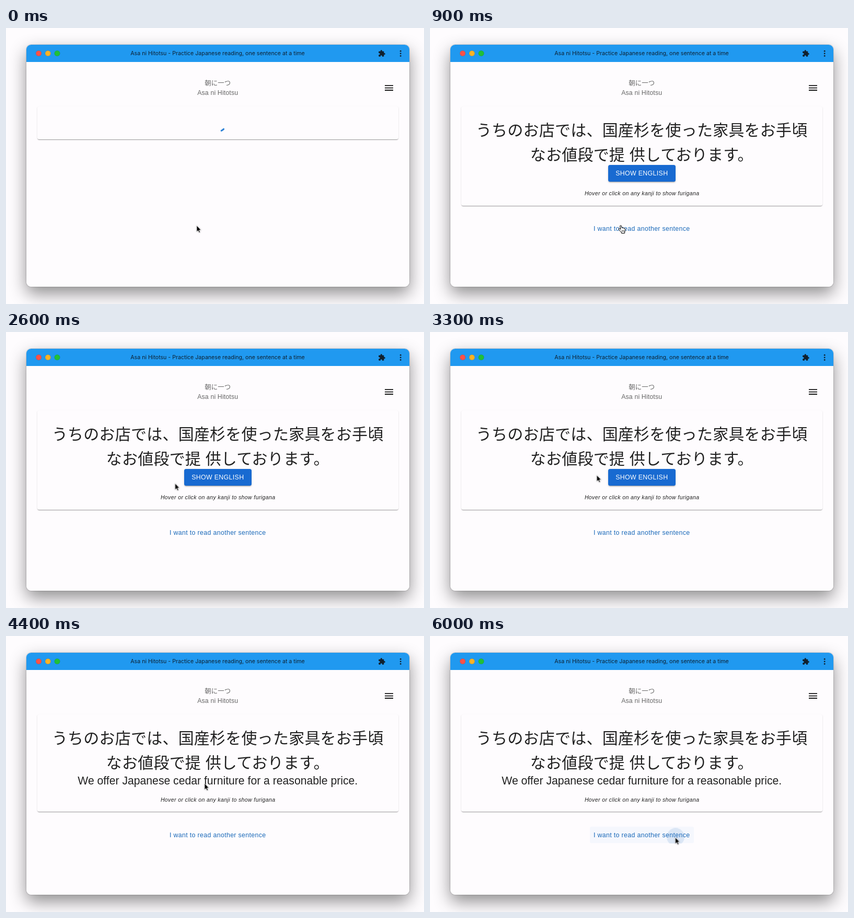
Animation, 800 px wide and 528 px high, one loop 6100 ms. Source, as an HTML page:

```html
<!DOCTYPE html>
<html lang="ja">
<head>
<meta charset="utf-8">
<title>Asa ni Hitotsu</title>
<style>
  html, body { margin: 0; width: 100%; height: 100%; overflow: hidden; background: #fefcfe; }
  body { position: relative; font-family: "Liberation Sans", "Noto Sans CJK JP", "Noto Sans CJK", sans-serif; color: #212121; }
  body *, body *::after { animation-duration: 6100ms; animation-iteration-count: infinite; animation-timing-function: linear; }
  div, p, i { position: absolute; box-sizing: border-box; margin: 0; }
  svg { position: absolute; left: 0; top: 0; overflow: visible; }

  .window { left: 39px; top: 32px; width: 733px; height: 463px; border-radius: 9px; overflow: hidden; background: #fefcfe; }
  .shadow { left: 39px; top: 32px; width: 733px; height: 463px; border-radius: 9px;
    box-shadow: 0 0 1.5px rgba(0,0,0,.6), 0 13px 32px rgba(0,0,0,.44); }
  .bar { left: 0; top: 0; width: 100%; height: 33px; background: #2099f0; }
  .card { left: 60px; top: 150px; width: 690.5px; height: 63.4px; border-radius: 3.5px; background: #fefcfe;
    box-shadow: 0 1.8px .9px -.9px rgba(0,0,0,.2), 0 .9px .9px rgba(0,0,0,.14), 0 .9px 2.6px rgba(0,0,0,.12);
    animation-name: card; animation-timing-function: step-end; }

  .title { font: 10.62px Inter, "Noto Sans", sans-serif; fill: #0e2233; text-anchor: end; }
  .brand { font-size: 12.35px; letter-spacing: .0107em; fill: #666; text-anchor: middle; }
  .sentence { font-size: 30px; letter-spacing: .00735em; fill: #212121; text-anchor: middle; }
  .line { left: 60px; width: 690.5px; text-align: center; white-space: nowrap; }
  .english { top: 261.7px; font-size: 21.18px; line-height: 30px; }
  .hint { top: 305.7px; font-size: 10.59px; line-height: 20px; letter-spacing: .0333em; font-style: italic; text-indent: .8px; }

  .btn { height: 32px; line-height: 32px; font-size: 12.35px; letter-spacing: .02857em; text-align: center;
    white-space: nowrap; border-radius: 3.5px; overflow: hidden; }
  .show { left: 341px; top: 262.2px; width: 128.6px; color: #fff; animation-name: hoverShow; }
  .link { left: 305.5px; top: 368.3px; width: 199.5px; color: #1a69b9; animation-name: hoverLink; }
  .ripple { border-radius: 50%; background: currentColor; opacity: 0; }
  .show .ripple { left: -51px; top: -71px; width: 180px; height: 180px; animation-name: rippleShow; }
  .link .ripple { left: -1.5px; top: -146px; width: 332px; height: 332px; animation-name: rippleLink; }

  .loading, .loaded, .ask, .answer, .lower, .arrow, .hand { animation-timing-function: step-end; }
  .loading { animation-name: loading; }
  .loaded { animation-name: loaded; }
  .ask { animation-name: ask; }
  .answer { animation-name: answer; }
  .lower { left: 0; top: 0; animation-name: lower; }
  .spin { animation-name: spin; }
  .dash { fill: none; stroke: #1976d2; stroke-width: 3.6; animation-name: dash; }
  .cursor { animation-name: move; filter: drop-shadow(0 .8px .8px rgba(0,0,0,.35)); }
  .arrow { animation-name: arrow; }
  .hand { animation-name: hand; }

  @keyframes card { 0% { height: 63.4px } 13.1% { height: 189.6px } 67.2% { height: 186px } }
  @keyframes loading { 0% { opacity: 1 } 13.1%, 100% { opacity: 0 } }
  @keyframes loaded { 0% { opacity: 0 } 13.1%, 100% { opacity: 1 } }
  @keyframes ask { 0% { opacity: 0 } 13.1% { opacity: 1 } 67.2%, 100% { opacity: 0 } }
  @keyframes answer { 0% { opacity: 0 } 67.2%, 100% { opacity: 1 } }
  @keyframes lower { 0% { transform: none } 67.2%, 100% { transform: translateY(-3.5px) } }

  @keyframes spin { 0% { transform: rotate(36.5deg) } 20.62%, 100% { transform: rotate(360deg) } }
  @keyframes dash {
    0% { stroke-dasharray: 9.4px, 200px; stroke-dashoffset: -1.3px; animation-timing-function: cubic-bezier(.354,.264,.567,1) }
    9.15% { stroke-dasharray: 100px, 200px; stroke-dashoffset: -15px; animation-timing-function: ease-in-out }
    20.62%, 100% { stroke-dasharray: 100px, 200px; stroke-dashoffset: -125px }
  }

  @keyframes hoverShow {
    0%, 58.2% { background: #186ad1;
      box-shadow: 0 2.6px .9px -1.8px rgba(0,0,0,.2), 0 1.8px 1.8px rgba(0,0,0,.14), 0 .9px 4.4px rgba(0,0,0,.12);
      animation-timing-function: cubic-bezier(.4,0,.2,1) }
    62.3%, 100% { background: #1259ba;
      box-shadow: 0 1.8px 3.5px -.9px rgba(0,0,0,.2), 0 3.5px 4.4px rgba(0,0,0,.14), 0 .9px 8.8px rgba(0,0,0,.12) }
  }
  @keyframes hoverLink {
    0%, 14.75% { background: rgba(25,118,210,0) }
    18.85%, 34.43% { background: rgba(25,118,210,.04) }
    38.5%, 91.3% { background: rgba(25,118,210,0) }
    95.4%, 100% { background: rgba(25,118,210,.04) }
  }
  @keyframes rippleShow {
    0%, 61.79% { opacity: 0; transform: scale(0) }
    61.8% { opacity: .1; transform: scale(0); animation-timing-function: cubic-bezier(.4,0,.2,1) }
    70.82%, 100% { opacity: .3; transform: scale(1) }
  }
  @keyframes rippleLink {
    0%, 96.77% { opacity: 0; transform: scale(0) }
    96.78% { opacity: .1; transform: scale(0); animation-timing-function: cubic-bezier(.575,0,.69,.516) }
    100% { opacity: .2; transform: scale(.52) }
  }

  @keyframes move {
    0%, 33.6% { transform: translate(365px, 378px); animation-timing-function: ease-in-out }
    41% { transform: translate(327px, 300px); animation-timing-function: ease-out }
    47.5% { transform: translate(318px, 273px) }
    55.74% { transform: translate(319.5px, 274.3px); animation-timing-function: ease-in-out }
    61.48%, 72.1% { transform: translate(380px, 282px); animation-timing-function: ease-in-out }
    82%, 85.4% { transform: translate(554.2px, 311.8px); animation-timing-function: ease-in-out }
    91.8% { transform: translate(474px, 386px) }
    93.44% { transform: translate(468px, 395px); animation-timing-function: ease-in-out }
    96.4%, 100% { transform: translate(469.5px, 385.5px) }
  }
  @keyframes arrow {
    0% { opacity: 1 } 14.5% { opacity: 0 } 35.2% { opacity: 1 } 58.2% { opacity: 0 }
    67.2% { opacity: 1 } 91.3% { opacity: 0 } 97.5%, 100% { opacity: 1 }
  }
  @keyframes hand {
    0% { opacity: 0 } 14.5% { opacity: 1 } 35.2% { opacity: 0 } 58.2% { opacity: 1 }
    67.2% { opacity: 0 } 91.3% { opacity: 1 } 97.5%, 100% { opacity: 0 }
  }
</style>
</head>
<body>
  <div class="shadow"></div>
  <div class="window"><div class="bar"></div></div>
  <div class="card"></div>

  <svg width="800" height="528">
    <g stroke="#000" stroke-opacity=".16" stroke-width=".6">
      <circle cx="62.5" cy="48.5" r="5.3" fill="#fd5148"/>
      <circle cx="80.3" cy="48.5" r="5.3" fill="#fdb225"/>
      <circle cx="98" cy="48.5" r="5.3" fill="#20c038"/>
    </g>
    <text class="title" x="571.8" y="52.2">Asa ni Hitotsu - Practice Japanese reading, one sentence at a time</text>
    <g fill="#10202e">
      <path transform="translate(712 41.5) scale(.6)" d="M20.5 11H19V7c0-1.1-.9-2-2-2h-4V3.5a2.5 2.5 0 0 0-5 0V5H4c-1.1 0-2 .9-2 2v3.8h1.5a2.7 2.7 0 0 1 0 5.4H2V20c0 1.1.9 2 2 2h3.8v-1.5a2.7 2.7 0 0 1 5.4 0V22H17c1.1 0 2-.9 2-2v-4h1.5a2.5 2.5 0 0 0 0-5z"/>
      <circle cx="755.2" cy="44.2" r="1.4"/>
      <circle cx="755.2" cy="48.8" r="1.4"/>
      <circle cx="755.2" cy="53.4" r="1.4"/>
    </g>
    <path d="M725 110.2h16M725 114.6h16M725 119h16" stroke="#151515" stroke-width="1.8"/>
    <text class="brand" x="405.2" y="109.9">朝に一つ</text>
    <text class="brand" x="405.2" y="128.4">Asa ni Hitotsu</text>

    <g class="loading">
      <g transform="translate(405 182) scale(.802)">
        <g class="spin"><circle class="dash" r="20.2"/></g>
      </g>
    </g>
    <g class="loaded">
      <text class="sentence" x="405.2" y="206.2">うちのお店では、国産杉を使った家具をお手頃</text>
      <text class="sentence" x="405.2" y="252.8">なお値段で提 供しております。</text>
    </g>
  </svg>

  <div class="ask"><div class="btn show">SHOW ENGLISH<i class="ripple"></i></div></div>
  <div class="answer"><p class="line english">We offer Japanese cedar furniture for a reasonable price.</p></div>
  <div class="loaded">
    <div class="lower">
      <p class="line hint">Hover or click on any kanji to show furigana</p>
      <div class="btn link">I want to read another sentence<i class="ripple"></i></div>
    </div>
  </div>

  <svg width="800" height="528">
    <g class="cursor">
      <path class="arrow" d="M0 0V12L2.8 9.4 4.6 13.6 6.6 12.8 4.8 8.7H8.3Z" fill="#000" stroke="#fff" stroke-width=".8"/>
      <g class="hand" stroke="#000" stroke-width="1" stroke-linejoin="round">
        <path fill="#fff" d="M-1.2 .8C-1-.4 .9-.5 1.3 .8L2.2 4.6C2.8 3.8 4.2 4 4.4 5 5 4.3 6.3 4.6 6.5 5.6 7.3 5.1 8.3 5.6 8.4 6.6 8.6 9 8.4 10.5 7.4 12V14.5H1.6V13C.2 11.4-1.8 9.8-3.4 7.6-4.6 5.9-2.9 5-1.6 6L-.1 7.4Z"/>
        <path fill="none" stroke-width=".7" d="M2.4 8.5v3.4M4.3 8.5v3.4M6.2 8.5v3.4"/>
      </g>
    </g>
  </svg>
</body>
</html>
```
